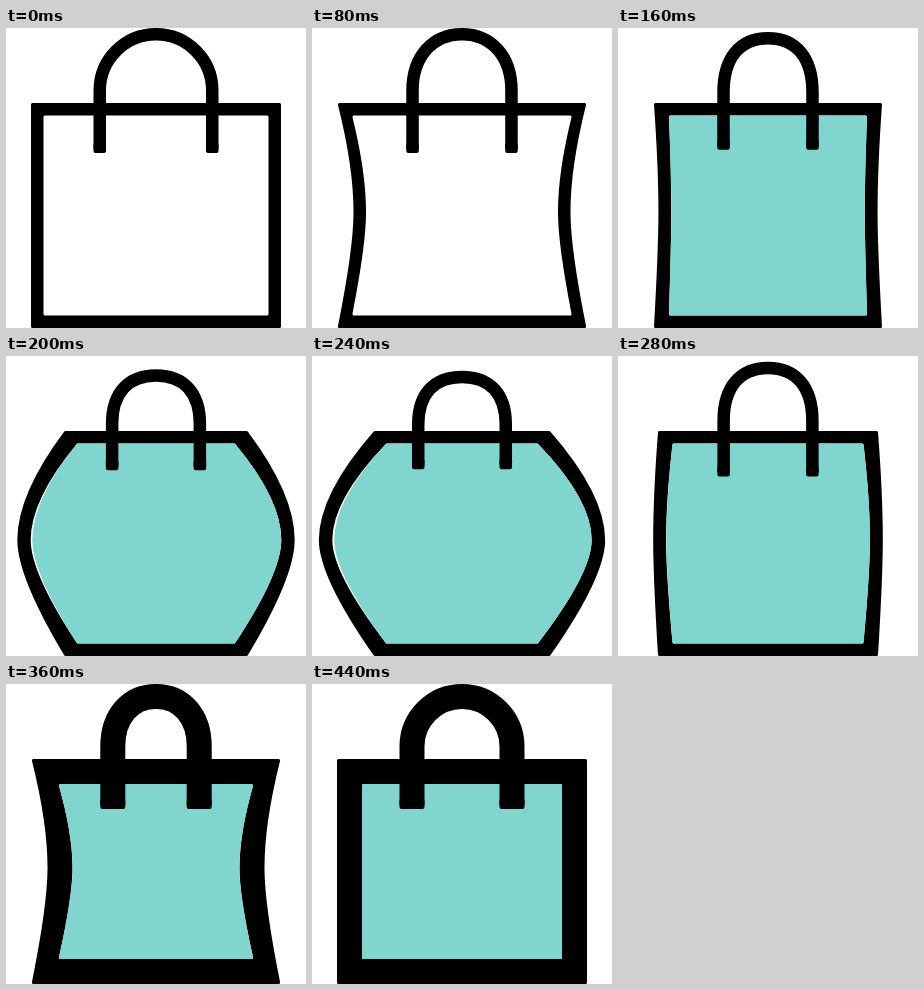
Write an HTML page with a canvas that moves like this. It is 300 by 300 pixels and loops after 1040 ms.

```html
<!DOCTYPE html>
<html lang="en">
<head>
<meta charset="utf-8">
<title>Shopping bag</title>
<style>
html, body { margin: 0; width: 100%; height: 100%; overflow: hidden; background: #fff; }
canvas { display: block; width: 100vw; height: 100vh; }
</style>
</head>
<body>
<canvas id="stage" width="300" height="300"></canvas>
<script>
const ctx = document.getElementById('stage').getContext('2d');
const LOOP = 1040, STEP = 40, CX = 150, WAIST = 184;
const INK = '#000', MINT = '#80d6cf', PAPER = '#fff';

// Key moments, in steps: squeezed, most inflated, squeezed again, at rest.
const SQUEEZED = 3, PEAK = 5.7, RELEASE = 8, END = 11;
const FILL_FROM = 4, THICKEN = 7;

const ramp = (s, a, b) => Math.min(1, Math.max(0, (s - a) / (b - a)));
const ease = p => p * p * p * (p * (6 * p - 15) + 10);

function pose(s) {
  const pinch = Math.min(ramp(s, 0, SQUEEZED), ramp(s, END, RELEASE)) ** 1.3;
  const swell = ease(Math.min(ramp(s, SQUEEZED, PEAK), ramp(s, RELEASE, PEAK)));
  const weight = 12.5 + 12.5 * ramp(s, THICKEN, THICKEN + 2);
  const corner = 125 - 1.5 * pinch - 35.5 * swell;
  const middle = 125 - 28 * pinch + 47 * swell;
  return {
    weight, corner, middle,
    inCorner: corner - weight - 3.5 * pinch + 4 * swell,
    inMiddle: middle - weight - swell,
    gap: 2 * swell * swell,
    grip: 62.5 - 11.5 * pinch - swell,
    top: 15 * swell
  };
}

// Bag outline with bowed sides; the round stroke softens its corners.
function panel(corner, left, right, inset, color) {
  const r = 1.5, y0 = 75 + inset + r, y1 = 300 - inset - r;
  const c = corner - r, lx = CX - left + r, rx = CX + right - r;
  const upper = y0 + (WAIST - y0) * 0.58, lower = y1 - (y1 - WAIST) * 0.68;
  ctx.beginPath();
  ctx.moveTo(CX - c, y0);
  ctx.lineTo(CX + c, y0);
  ctx.quadraticCurveTo(rx, upper, rx, WAIST);
  ctx.quadraticCurveTo(rx, lower, CX + c, y1);
  ctx.lineTo(CX - c, y1);
  ctx.quadraticCurveTo(lx, lower, lx, WAIST);
  ctx.quadraticCurveTo(lx, upper, CX - c, y0);
  ctx.closePath();
  ctx.fillStyle = ctx.strokeStyle = color;
  ctx.lineWidth = 2 * r;
  ctx.lineJoin = 'round';
  ctx.fill();
  ctx.stroke();
}

function handle(half, top, weight) {
  const h = half - weight / 2, y = top + weight / 2;
  const bottom = 125 - 0.8 * top, side = 62.5 + 0.4 * top;
  const k = 0.552 + 0.007 * (62.5 - half); // narrower grips get squarer shoulders
  const rise = (side - y) * k;
  ctx.beginPath();
  ctx.moveTo(CX - h, bottom - 4);
  ctx.lineTo(CX - h, side);
  ctx.bezierCurveTo(CX - h, side - rise, CX - h * k, y, CX, y);
  ctx.bezierCurveTo(CX + h * k, y, CX + h, side - rise, CX + h, side);
  ctx.lineTo(CX + h, bottom - 4);
  ctx.strokeStyle = ctx.fillStyle = INK;
  ctx.lineWidth = weight;
  ctx.stroke();
  for (const x of [CX - half, CX + half - weight]) {
    ctx.beginPath();
    ctx.roundRect(x, bottom - 10, weight, 10, 2);
    ctx.fill();
  }
}

function draw(s) {
  const p = pose(s);
  ctx.fillStyle = PAPER;
  ctx.fillRect(0, 0, 300, 300);
  panel(p.corner, p.middle, p.middle, 0, INK);
  panel(p.inCorner, p.inMiddle, p.inMiddle, p.weight, PAPER);
  if (s >= FILL_FROM) {
    panel(p.inCorner, p.inMiddle - p.gap, p.inMiddle, p.weight, MINT);
  }
  handle(p.grip, p.top, p.weight);
}

function tick() {
  const t = performance.now() % LOOP;
  draw(Math.min(Math.floor(t / STEP), END));
  requestAnimationFrame(tick);
}
tick();
</script>
</body>
</html>
```
